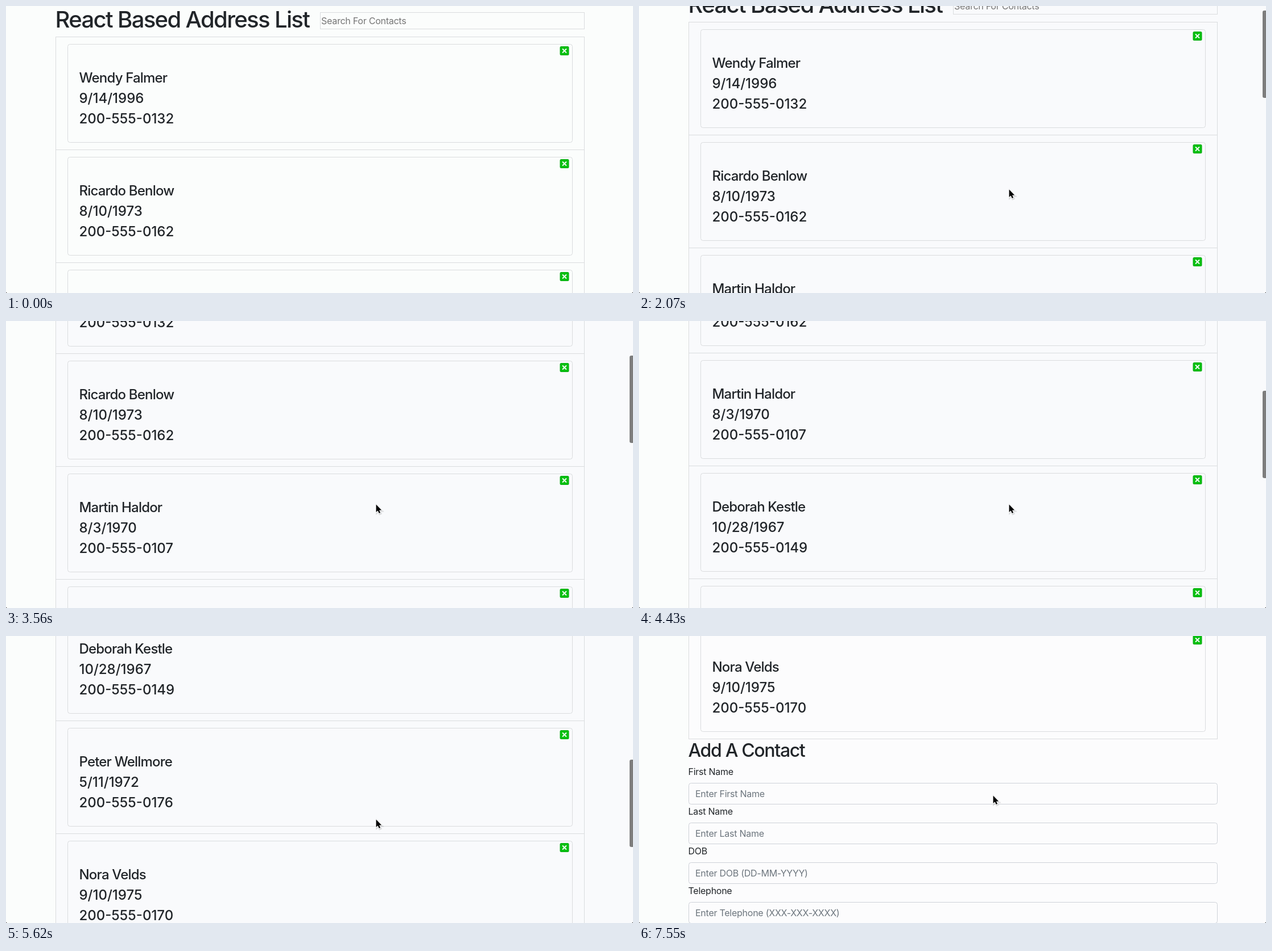
These frames come from a looping animation (1102 by 506 pixels, 7.99 s). An HTML page:

```html
<!DOCTYPE html>
<html lang="en">
<head>
<meta charset="utf-8">
<title>Address list</title>
<style>
  html, body { margin: 0; width: 100%; height: 100%; overflow: hidden; background: #fbfdfc; }
  svg { display: block; width: 1102px; height: 506px; }
  text { font-family: Inter, "Open Sans", sans-serif; font-optical-sizing: none; fill: #212529; }
  .title { font-size: 40px; font-weight: 500; letter-spacing: -.041em; }
  .heading { font-size: 32px; font-weight: 500; letter-spacing: -.042em; }
  .name { font-size: 24px; font-weight: 500; letter-spacing: -.034em; }
  .digits { font-size: 24px; font-weight: 500; }
  .label, .hint, .search { font-size: 16px; letter-spacing: -.016em; }
  .hint { fill: #6c757d; }
  .search { fill: #757575; }
  .line { fill: none; stroke: #dadcde; }
  .field { fill: none; stroke: #ced2d8; }
</style>
</head>
<body>
<svg id="stage" viewBox="0 0 1102 506">
  <defs>
    <g id="close">
      <rect width="16" height="16" rx="2.5" fill="#08ad12"/>
      <rect x="1" y="1" width="14" height="14" rx="1.8" fill="#06c010"/>
      <path d="M4.5 4.5l7 7M11.5 4.5l-7 7" stroke="#fff" stroke-width="1.8"/>
    </g>
    <path id="arrow" d="M0 0V13.6L3.1 10.8L5.2 15.6L7.5 14.6L5.4 9.9H9.6Z"/>
  </defs>
  <rect width="1102" height="506" fill="#fbfdfc"/>
  <rect id="tint" x="88" width="1014" height="506"/>
  <g id="page"></g>
  <rect id="bar" x="1096" width="10" height="154" rx="3" fill="#7d7d7d"/>
  <g id="cursor">
    <use href="#arrow" x="1" y="1.5" fill="none" stroke="#000" stroke-width="3" opacity=".12"/>
    <use href="#arrow" fill="#000" stroke="#fff" stroke-width="1.6" paint-order="stroke"/>
  </g>
  <path d="M0 504.5V506H2ZM1102 504.5V506H1100Z" fill="#333"/>
</svg>
<script>
const LOOP = 7990, TICK = 148;
const ROW = 199, LIST_TOP = 54.5, FORM_TOP = 1267, FIELD_STEP = 70;
const BAR_RATIO = 506 / 1625;
const $ = id => document.getElementById(id);

const contacts = [
  ["Wendy Falmer", "9/14/1996", "200-555-0132"],
  ["Ricardo Benlow", "8/10/1973", "200-555-0162"],
  ["Martin Haldor", "8/3/1970", "200-555-0107"],
  ["Deborah Kestle", "10/28/1967", "200-555-0149"],
  ["Peter Wellmore", "5/11/1972", "200-555-0176"],
  ["Nora Velds", "9/10/1975", "200-555-0170"]
];
const fields = [
  ["First Name", "Enter First Name"],
  ["Last Name", "Enter Last Name"],
  ["DOB", "Enter DOB (DD-MM-YYYY)"],
  ["Telephone", "Enter Telephone (XXX-XXX-XXXX)"]
];

// Scroll gestures; start and length in ticks
const swipes = [
  { start: 11, length: 10, distance: 122 },
  { start: 22, length: 4, distance: 148 },
  { start: 27, length: 4, distance: 149 },
  { start: 32, length: 8, distance: 334 },
  { start: 41, length: 2.75, distance: 314 }
];

const text = (cls, x, y, s) => `<text class="${cls}" x="${x}" y="${y}">${s}</text>`;
const box = (cls, x, y, w, h, r = 0) =>
  `<rect class="${cls}" x="${x}" y="${y}" width="${w}" height="${h}" rx="${r}"/>`;

function contactRow([name, born, phone], i) {
  return `<g transform="translate(0 ${i * ROW})">` +
    box("line", 87.5, LIST_TOP, 929, ROW) +
    box("line", 108.5, 67.5, 887, 173, 4) +
    `<use href="#close" x="973.5" y="71"/>` +
    text("name", 128.5, 135, name) +
    text("digits", 128.5, 171, born) +
    text("digits", 128.5, 207, phone) + `</g>`;
}

function formField([label, hint], i) {
  return `<g transform="translate(0 ${FORM_TOP + i * FIELD_STEP})">` +
    text("label", 86.5, 45, label) +
    box("field", 87.5, 59.5, 929, 37, 4) +
    text("hint", 99, 84, hint) + `</g>`;
}

$("page").innerHTML =
  text("title", 86.5, 37.5, "React Based Address List") +
  box("line", 552.5, 11.5, 464, 29) +
  text("search", 554, 32, "Search For Contacts") +
  contacts.map(contactRow).join("") +
  text("heading", 86.5, FORM_TOP + 12.5, "Add A Contact") +
  fields.map(formField).join("");

function ease(tick, start, length) {
  const p = Math.min(1, Math.max(0, (tick - start) / length));
  return p * p * (3 - 2 * p);
}

const lerp = (a, b, p) => a + (b - a) * p;
const bezier = (a, b, c, d, p) => {
  const q = 1 - p;
  return a * q ** 3 + 3 * b * q * q * p + 3 * c * q * p * p + d * p ** 3;
};

const scrollAt = tick => Math.round(
  swipes.reduce((sum, s) => sum + s.distance * ease(tick, s.start, s.length), 0));

// Short nudge, a sweep round to the left, then a rest and a last move up
function cursorAt(tick) {
  const nudge = ease(tick, 1, 1), sweep = ease(tick, 3, 6), leave = ease(tick, 46, 3);
  const x = bezier(lerp(651, 660, nudge), 520, 570, 650.5, sweep);
  const y = bezier(444, 470, 350, 323.5, sweep);
  return [lerp(x, 622.5, leave), lerp(y, 281.5, leave)];
}

function pageTint(tick) {
  if (tick < 12) return "#fbfdfc";
  return tick < 42 ? "#f9fafc" : "#fcfcfd";
}

function draw(t) {
  const tick = Math.floor((t + 10) / TICK);
  const scroll = scrollAt(tick);
  $("page").setAttribute("transform", `translate(0 ${-scroll})`);
  $("tint").setAttribute("fill", pageTint(tick));
  $("bar").setAttribute("y", Math.round(scroll * BAR_RATIO));
  $("bar").setAttribute("opacity", tick < 12 ? 0 : Math.min(1, Math.max(0, (51 - tick) / 2)));
  $("cursor").setAttribute("transform", `translate(${cursorAt(tick).join(" ")})`);
  $("cursor").setAttribute("opacity", tick < 1 ? 0 : 1);
}

let start;
function loop(now) {
  start ??= now;
  draw((now - start) % LOOP);
  requestAnimationFrame(loop);
}
draw(0);
requestAnimationFrame(loop);
</script>
</body>
</html>
```
